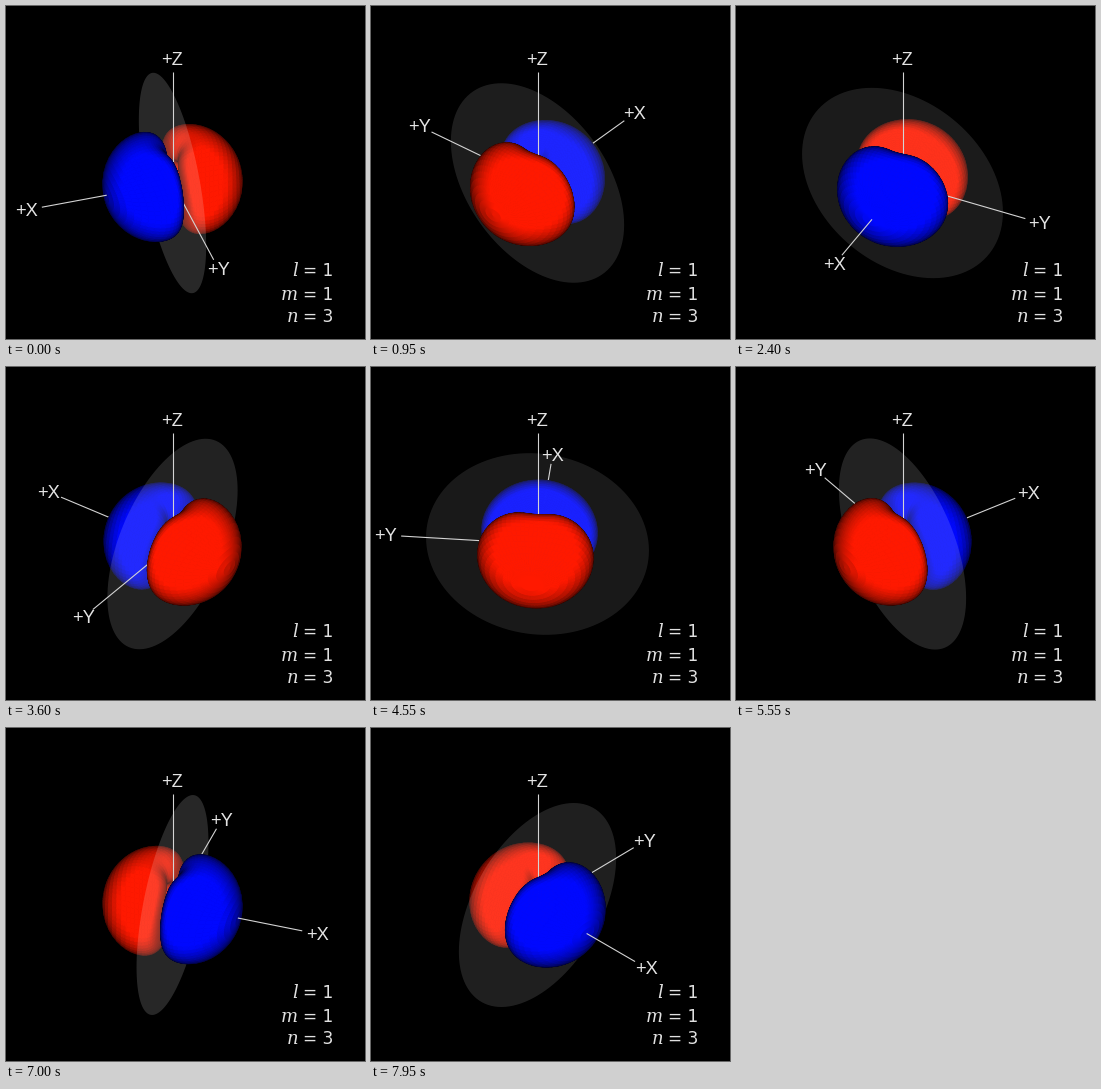
A matplotlib script that plays this animation: 359x333 px, repeating every 8 s.

```python
import numpy as np
import matplotlib.pyplot as plt
from matplotlib.animation import FuncAnimation
from matplotlib.collections import PolyCollection
from matplotlib.patches import Polygon

W, H, DPI = 359, 333, 64
FRAMES, STEP = 160, 50
CENTER = np.array([166.5, 177.0])
TILT = np.radians(36)
AXIS_LEN, LABEL_DIST, DISC_R, TIP = 137, 153, 112, 70
ISO = 0.27
BLUE, RED = np.array([0, 8, 255]) / 255, np.array([255, 25, 0]) / 255


def radial(r):
    """Outer part of the 3p radial function."""
    return r * (r - 6) * np.exp(-r / 3)


def bisect(lo, hi):
    """Radius between lo (below ISO) and hi (above ISO) on the surface."""
    for _ in range(50):
        mid = (lo + hi) / 2
        lo, hi = (mid, hi) if radial(mid) < ISO else (lo, mid)
    return hi


def build_lobe(n_prof=40, n_az=68):
    """Quads and normals of the +x lobe of radial^2 sin^2(theta) cos(phi) = ISO^2."""
    r_in, r_out = bisect(6, 10), bisect(30, 10)
    s = np.linspace(0, np.pi, n_prof + 1)
    r = ((r_in + r_out) / 2 - (r_out - r_in) / 2 * np.cos(s))[:, None]
    az = np.linspace(0, 2 * np.pi, n_az + 1)[None, :]
    a = np.clip((ISO / radial(r)) ** 2, 0, 1)
    a[[0, -1]] = 1
    k = np.cos(az) ** 2
    cos2 = np.clip(2 * a ** 2 / (k + np.sqrt(k ** 2 + 4 * (1 - k) * a ** 2)), 0, 1)
    rho = r * np.sqrt(1 - cos2)
    pts = np.stack([r * np.sqrt(cos2), rho * np.cos(az), rho * np.sin(az)], -1)
    pts *= TIP / r_out
    quads = np.stack([pts[:-1, :-1], pts[1:, :-1], pts[1:, 1:], pts[:-1, 1:]], 2)
    quads = quads.reshape(-1, 4, 3)
    normals = np.cross(quads[:, 3] - quads[:, 1], quads[:, 2] - quads[:, 0])
    normals /= np.linalg.norm(normals, axis=1, keepdims=True)
    # the face at the far tip must point outwards
    return quads, normals * np.sign(normals[-1, 0])


QUADS, NORMALS = build_lobe()


def spin(i):
    """Azimuth of +X; the turn slows down exponentially."""
    return np.radians(162.5 + 699.5 * (1 - np.exp(-0.0124 * i)))


def view(phi):
    """Rows: X, Y, Z axes as (right, down, towards viewer)."""
    def flat(a):
        return [np.cos(a), np.sin(a) * np.sin(TILT), np.sin(a) * np.cos(TILT)]
    return np.array([flat(phi), flat(phi - np.pi / 2),
                     [0, -np.cos(TILT), np.sin(TILT)]])


def px(size):
    return size * 72 / DPI


fig = plt.figure(figsize=(W / DPI, H / DPI), dpi=DPI, facecolor="black")
ax = fig.add_axes([0, 0, 1, 1])
ax.set_xlim(0, W)
ax.set_ylim(H, 0)
ax.axis("off")

back, front = [ax.add_collection(PolyCollection([], edgecolors="face",
                                                linewidths=px(0.9), zorder=z),
                                 autolim=False) for z in (2, 5)]
disc = ax.add_patch(Polygon(np.zeros((3, 2)), facecolor="white", linewidth=0, zorder=3))
lines = [ax.plot([], [], color="#d4d4d4", lw=px(1.1), zorder=4,
                 solid_capstyle="butt")[0] for _ in "XYZ"]
labels = [ax.text(0, 0, "+" + c, color="#e4e4e4", family="Liberation Sans",
                  size=px(18.3), ha="center", va="baseline", zorder=7) for c in "XYZ"]

for name, value, base in (("l", 1, 270.5), ("m", 1, 293.5), ("n", 3, 316.5)):
    ax.text(292, base, name, color="#e0e0e0", family="DejaVu Serif", style="italic",
            size=px(18), ha="right", va="baseline", zorder=7)
    ax.text(327.5, base, f"= {value}", color="#e0e0e0", family="DejaVu Sans",
            size=px(17), ha="right", va="baseline", zorder=7)


def paint_lobe(coll, sign, axes):
    color = BLUE if sign > 0 else RED
    facing = sign * NORMALS @ axes[:, 2]
    seen = facing > -0.05
    pts = sign * QUADS[seen] @ axes
    order = np.argsort(pts[..., 2].mean(1))
    light = np.clip(0.15 + 1.15 * facing[seen][order], 0, 1)
    coll.set_verts(pts[order][..., :2] + CENTER)
    coll.set_facecolor(light[:, None] * color)


def update(i):
    phi = spin(i)
    axes = view(phi)
    near = 1 if axes[0, 2] > 0 else -1
    paint_lobe(back, -near, axes)
    paint_lobe(front, near, axes)

    t = np.linspace(0, 2 * np.pi, 121)
    rim = np.outer(np.cos(t), axes[1, :2]) + np.outer(np.sin(t), axes[2, :2])
    disc.set_xy(CENTER + DISC_R * rim)
    disc.set_alpha(0.185 - 0.085 * abs(np.sin(phi)))

    for k, (line, label) in enumerate(zip(lines, labels)):
        start = TIP - 1 if k == 0 else 0
        ends = CENTER + np.outer([start, AXIS_LEN], axes[k, :2])
        line.set_data(ends[:, 0], ends[:, 1])
        x, y = CENTER + LABEL_DIST * axes[k, :2]
        label.set_position((x, y + 6))
    lines[0].set_zorder(6 if near > 0 else 1)
    return [back, front, disc, *lines, *labels]


anim = FuncAnimation(fig, update, frames=FRAMES, interval=STEP,
                     init_func=lambda: update(0), repeat=True, repeat_delay=0)
plt.show()
```
